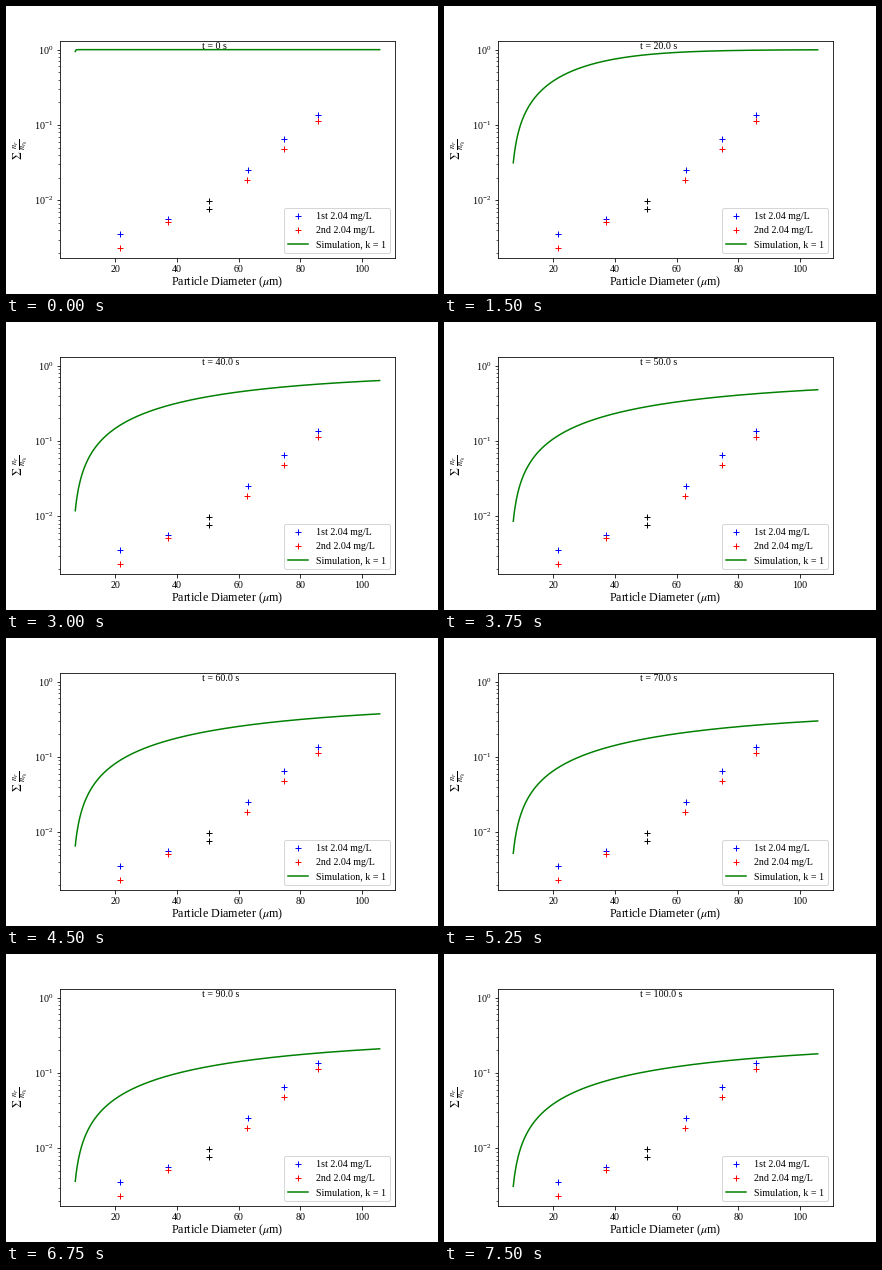
Animation of 432x288 px, one loop 8 s. Source, as a matplotlib script:

```python
import numpy as np
import matplotlib.pyplot as plt
from matplotlib.animation import FuncAnimation

plt.rcParams.update({
    "font.family": "Liberation Serif",
    "mathtext.fontset": "stix",
    "font.size": 10,
    "axes.labelsize": 12,
})

STEP = 10           # seconds of simulated time per picture
HOLD = 3            # animation frames per picture
FRAMES, INTERVAL = 32, 250

diameter = np.linspace(7.05, 105.7, 400)


def fraction(d, t):
    """Cumulative particle fraction below diameter d at time t."""
    growth = (21.8 / (t + 1.8)) ** 1.5
    u = 2.71 * growth * (1 - np.exp(-(d - 6) / 90))
    n = 2.5
    return (1 - np.exp(-u ** n)) ** (1 / n)


def label(t):
    return "t = 0 s" if t == 0 else f"t = {t:.1f} s"


fig, ax = plt.subplots(figsize=(6, 4), dpi=72)
fig.subplots_adjust(left=0.125, right=0.9, bottom=0.125, top=0.88)

sizes = np.array([21.6, 37.1, 50.4, 63.0, 74.7, 85.7])
first = np.array([0.00352, 0.00566, 0.0098, 0.0254, 0.0645, 0.1346])
second = np.array([0.00233, 0.00516, 0.00757, 0.0187, 0.0483, 0.1137])
mid = 2
rest = np.arange(len(sizes)) != mid

ax.plot(sizes[rest], first[rest], "b+", label="1st 2.04 mg/L")
ax.plot(sizes[rest] - 0.15, second[rest], "r+", label="2nd 2.04 mg/L")
ax.plot([sizes[mid]] * 2, [first[mid], second[mid]], "k+")
curve, = ax.plot(diameter, fraction(diameter, 0), color="green",
                 label="Simulation, k = 1")
clock = ax.text(48, 1.02, label(0))

ax.set_yscale("log")
ax.set_xlim(2.1, 110.6)
ax.set_ylim(0.00171, 1.32)
ax.set_xticks(range(20, 101, 20))
ax.set_xlabel(r"Particle Diameter ($\mu$m)", labelpad=1)
ax.set_ylabel(r"$\Sigma\ \frac{n_r}{n_{r_0}}$")
ax.legend(loc="lower right")


def update(frame):
    t = frame // HOLD * STEP
    curve.set_ydata(fraction(diameter, t))
    clock.set_text(label(t))
    return curve, clock


anim = FuncAnimation(fig, update, frames=FRAMES, interval=INTERVAL,
                     repeat=True, repeat_delay=0)
plt.show()
```
